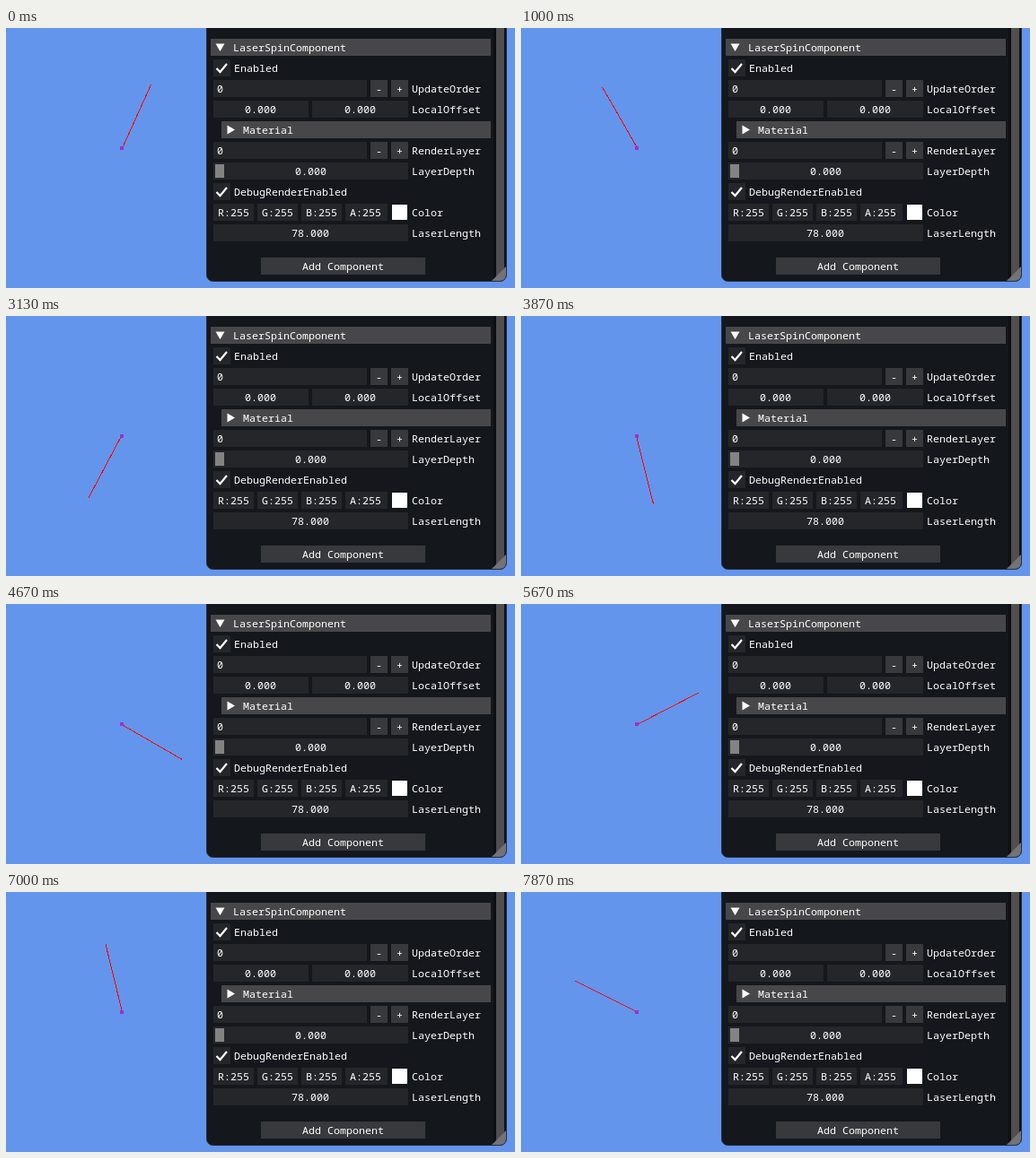
An HTML page with a canvas for the animation above (7.94 s loop, 567 by 290 pixels).

```html
<!DOCTYPE html>
<html lang="en">
<head>
<meta charset="utf-8">
<title>Laser spin</title>
<style>
  html, body { margin: 0; width: 567px; height: 290px; overflow: hidden; background: #6495ed; }
  canvas, svg { position: absolute; left: 0; top: 0; display: block; }
  rect { shape-rendering: crispEdges; }
  text { font: 11.667px "Noto Sans Mono", "DejaVu Sans Mono", monospace; fill: #fff; white-space: pre; }
  .mid { text-anchor: middle; }
  .head { fill: #474749; }
  .field { fill: #24262a; }
  .button { fill: #38393d; }
  .mark { fill: none; stroke: #fff; stroke-width: 2.2; }
</style>
</head>
<body>
<canvas id="stage" width="567" height="290"></canvas>
<svg width="567" height="290" viewBox="0 0 567 290">
  <!-- window and scrollbar -->
  <rect x="223.5" y="-20" width="334" height="302.5" rx="7" fill="#14171c" stroke="#2a2e36" style="shape-rendering:auto"/>
  <path d="M543 0H557V275Q557 282 550 282H543Z" fill="#0d0f12"/>
  <rect x="546" y="0" width="9" height="280" fill="#4f4f4f"/>
  <path d="M557 266V275Q557 282 550 282H541Z" fill="#717377"/>

  <rect class="head" x="228" y="12" width="312" height="19"/>
  <path d="M233.5 17.5H243.5L238.5 26Z" fill="#fff"/>
  <text x="253" y="26">LaserSpinComponent</text>

  <rect class="field" x="231" y="35" width="19" height="19"/>
  <path class="mark" d="M234.5 45L238.5 49L246 40"/>
  <text x="254" y="49">Enabled</text>

  <rect class="field" x="231" y="58" width="171" height="19"/>
  <rect class="button" x="406" y="58" width="19" height="19"/>
  <rect class="button" x="429" y="58" width="19" height="19"/>
  <text x="235" y="72">0</text>
  <text class="mid" x="415.5" y="72">-</text>
  <text class="mid" x="438.5" y="72">+</text>
  <text x="452" y="72">UpdateOrder</text>

  <rect class="field" x="231" y="81" width="106" height="19"/>
  <rect class="field" x="341" y="81" width="107" height="19"/>
  <text class="mid" x="283.5" y="95">0.000</text>
  <text class="mid" x="394.5" y="95">0.000</text>
  <text x="452" y="95">LocalOffset</text>

  <rect class="head" x="240" y="104" width="300" height="19"/>
  <path d="M246.5 108.5V118.5L255 113.5Z" fill="#fff"/>
  <text x="264" y="118">Material</text>

  <rect class="field" x="231" y="127" width="171" height="19"/>
  <rect class="button" x="406" y="127" width="19" height="19"/>
  <rect class="button" x="429" y="127" width="19" height="19"/>
  <text x="235" y="141">0</text>
  <text class="mid" x="415.5" y="141">-</text>
  <text class="mid" x="438.5" y="141">+</text>
  <text x="452" y="141">RenderLayer</text>

  <rect class="field" x="231" y="150" width="217" height="19"/>
  <rect x="233" y="152" width="10" height="15" fill="#838384"/>
  <text class="mid" x="339.5" y="164">0.000</text>
  <text x="452" y="164">LayerDepth</text>

  <rect class="field" x="231" y="173" width="19" height="19"/>
  <path class="mark" d="M234.5 183L238.5 187L246 178"/>
  <text x="254" y="187">DebugRenderEnabled</text>

  <rect class="field" x="231" y="196" width="45" height="19"/>
  <rect class="field" x="280" y="196" width="45" height="19"/>
  <rect class="field" x="329" y="196" width="45" height="19"/>
  <rect class="field" x="378" y="196" width="47" height="19"/>
  <rect x="430" y="197" width="17" height="17" fill="#fff"/>
  <text class="mid" x="253.5" y="210">R:255</text>
  <text class="mid" x="302.5" y="210">G:255</text>
  <text class="mid" x="351.5" y="210">B:255</text>
  <text class="mid" x="400.5" y="210">A:255</text>
  <text x="452" y="210">Color</text>

  <rect class="field" x="231" y="219" width="217" height="19"/>
  <text class="mid" x="339" y="233">78.000</text>
  <text x="452" y="233">LaserLength</text>

  <rect class="button" x="284" y="256" width="183" height="19"/>
  <text class="mid" x="375.5" y="270">Add Component</text>
</svg>
<script>
  const ctx = document.getElementById('stage').getContext('2d');
  const LOOP = 7940, FPS = 15, LAST = 118;
  const PIVOT = { x: 129, y: 134 }, LENGTH = 78;

  // Steps fall on the 10 ms tick nearest to each 1/15 s.
  function stepAt(ms) {
    const tick = Math.floor(ms / 10) * 10;
    return Math.min(LAST, Math.floor((tick + 5) * FPS / 1000));
  }

  // Degrees counter-clockwise from straight up; about 1 rad/s after a short first step.
  function angleAt(step) {
    return step === 0 ? -24.3 : 18.34 + (step - 12) * 3.8215;
  }

  // Hard-edged beam, one pixel wide, lying on one side of its axis.
  function drawLaser(degrees) {
    const a = degrees * Math.PI / 180;
    const dx = -Math.sin(a), dy = -Math.cos(a);
    ctx.fillStyle = '#f00';
    for (let y = -80; y < 80; y++) {
      for (let x = -80; x < 80; x++) {
        const px = x + 0.5, py = y + 0.5;
        const along = px * dx + py * dy;
        const across = py * dx - px * dy;
        if (along >= 0 && along < LENGTH && across >= 0 && across < 1) {
          ctx.fillRect(PIVOT.x + x, PIVOT.y + y, 1, 1);
        }
      }
    }
  }

  let shown = -1;
  function draw(step) {
    if (step === shown) return;
    shown = step;
    ctx.fillStyle = '#6495ed';
    ctx.fillRect(0, 0, 567, 290);
    drawLaser(angleAt(step));
    ctx.fillStyle = '#9932cc';
    ctx.fillRect(PIVOT.x - 2, PIVOT.y - 2, 4, 4);
  }

  const start = performance.now();
  function loop() {
    draw(stepAt((performance.now() - start) % LOOP));
    requestAnimationFrame(loop);
  }
  loop();
</script>
</body>
</html>
```
